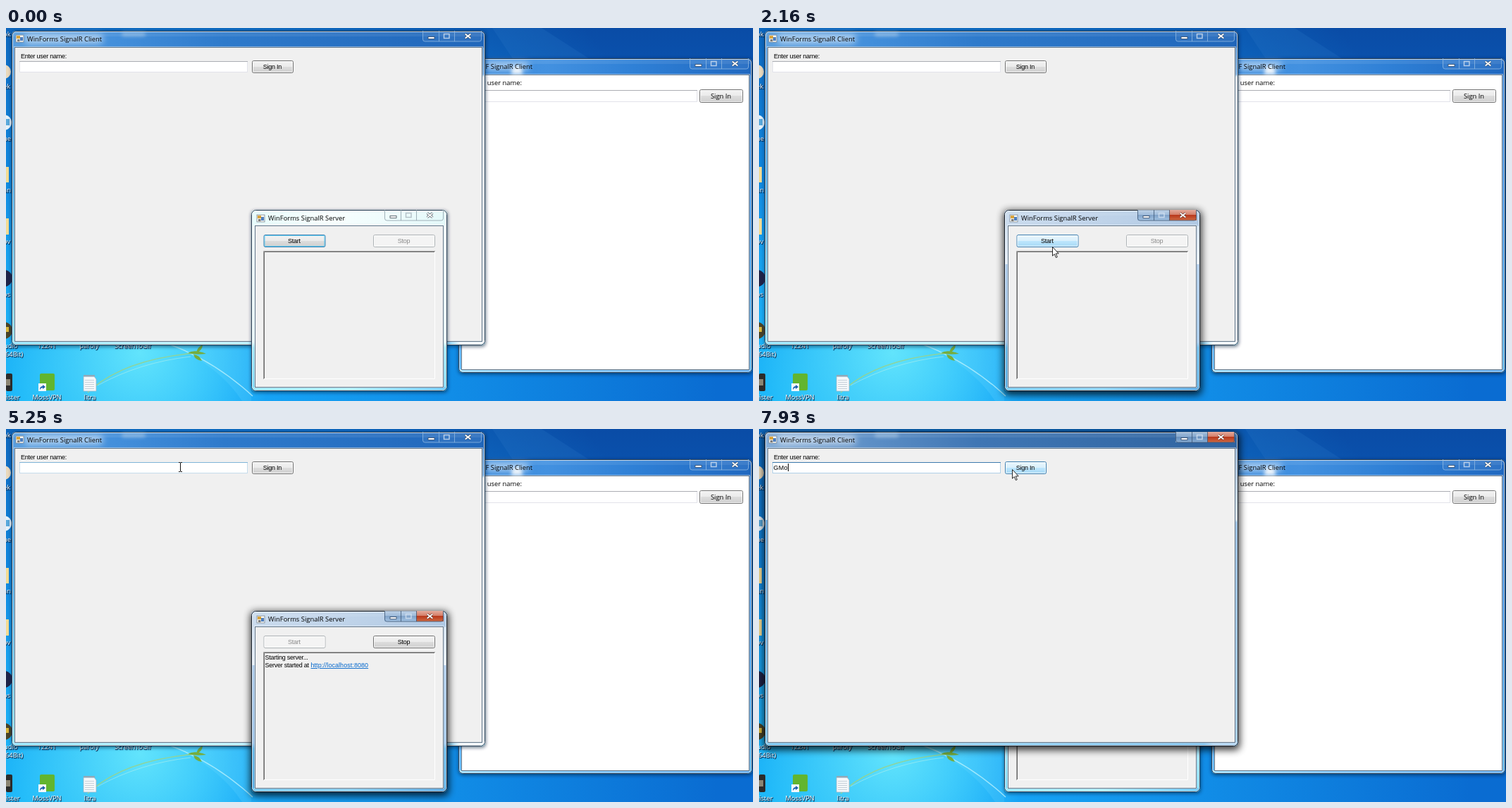
Animation of 1060x529 px, one loop 8000 ms. Source, as an HTML page:

```html
<!DOCTYPE html>
<html lang="en">
<head>
<meta charset="utf-8">
<title>SignalR chat demo</title>
<style>
html, body { margin: 0; width: 100%; height: 100%; overflow: hidden; background: #0b5cb4; }
svg { display: block; width: 100vw; height: 100vh; }
text { white-space: pre; }
.ui { font: 9.4px "Open Sans", "Noto Sans", sans-serif; }
.form { font: 9px "Liberation Sans", Arial, sans-serif; letter-spacing: -.25px; }
.link { letter-spacing: .05px; fill: #0066cc; text-decoration: underline; }
.typed { letter-spacing: .2px; }
.mid { text-anchor: middle; }
.end { text-anchor: end; }
</style>
</head>
<body>
<svg id="stage" viewBox="0 0 1060 529" preserveAspectRatio="none"></svg>
<script>
const LOOP = 8000;
const stage = document.getElementById('stage');
const $ = id => document.getElementById(id);

// Markup helpers
let defs = '', gradCount = 0;
const rect = (x, y, w, h, fill, more = '') =>
  `<rect x="${x}" y="${y}" width="${w}" height="${h}" fill="${fill}" ${more}/>`;
const path = (d, more) => `<path d="${d}" ${more}/>`;
const text = (x, y, s, cls, fill = '#000', more = '') =>
  `<text x="${x}" y="${y}" class="${cls}" fill="${fill}" ${more}>${s}</text>`;
const group = (id, body, hidden) =>
  `<g id="${id}"${hidden ? ' display="none"' : ''}>${body}</g>`;
const outline = (x, y, w, h, color, r = 0) =>
  rect(x + .5, y + .5, w - 1, h - 1, 'none', `stroke="${color}" rx="${r}"`);

// Stops are "color" or "color offset"; plain colors are spread evenly.
function grad(dir, ...stops) {
  const id = 'g' + gradCount++;
  const end = dir === 'v' ? 'x2="0" y2="1"' : 'x2="1" y2="0"';
  defs += `<linearGradient id="${id}" ${end}>` + stops.map((s, i) => {
    const [c, at = i / (stops.length - 1)] = s.split(' ');
    return `<stop offset="${at}" stop-color="${c}"/>`;
  }).join('') + '</linearGradient>';
  return `url(#${id})`;
}

function glow(id, cx, cy, r, color) {
  defs += `<radialGradient id="${id}" gradientUnits="userSpaceOnUse" cx="${cx}" cy="${cy}" r="${r}">
    <stop stop-color="${color}"/><stop offset="1" stop-color="${color}" stop-opacity="0"/></radialGradient>`;
  return rect(0, 0, 1060, 529, `url(#${id})`);
}

const blur = (id, size) =>
  `<filter id="${id}" x="-30%" y="-100%" width="160%" height="300%"><feGaussianBlur stdDeviation="${size}"/></filter>`;
defs += blur('soft', 2.5) + blur('wide', 5.5) + blur('halo', 5);

// Desktop
function label(x, y, s, cls = 'ui mid') {
  return text(x + .7, y + 1, s, cls, '#02294f', 'stroke="#02294f" stroke-width="1" stroke-opacity=".45"') +
    text(x, y, s, cls, '#fff');
}

function desktop() {
  const circle = (y, r, c) => `<circle cx="-3" cy="${y}" r="${r}" fill="${c}"/>`;
  let s = rect(0, 0, 1060, 529, grad('v', '#0a4ca6', '#0a62c2 .4', '#0a6cd0 .8', '#0a6cd2'));
  s += glow('sky', 250, 500, 760, '#18aefc') + glow('left', 40, 540, 330, '#20bcfa') + glow('core', 190, 460, 190, '#62e4fc');
  s += path('M690 0L760 0L830 45H720Z', 'fill="#2b74c2" opacity=".25"');
  s += path('M205 440Q285 462 350 522', 'fill="none" stroke="#c4f5fd" stroke-width="1.4" opacity=".75"');
  s += path('M215 440Q300 475 335 529H348V440Z', 'fill="#9be8fb" opacity=".12"');
  s += path('M116 517Q165 470 268 461', 'fill="none" stroke="#8fd49a" stroke-width="1.6"');
  s += path('M130 507Q190 474 262 466', 'fill="none" stroke="#c9f3e6" stroke-width=".7" opacity=".7"');
  s += path('M258 461Q267 455 284 462Q270 464 258 461M270 461Q271 453 279 449Q279 457 270 461M266 463Q268 471 278 472Q275 464 266 463',
    'fill="#76ad3d"');
  // Icons cut by the left edge
  s += circle(62, 10, '#e9d9bd') + circle(134, 11, '#e4f2fb') + rect(0, 129, 5, 9, '#5aa9dc');
  s += rect(0, 197, 4, 22, '#f3dc95') + rect(0, 270, 4, 23, '#f3dc95');
  s += circle(355, 12, '#1f2449') + circle(429, 12, '#4a4429') + rect(0, 424, 4, 7, '#d9b63a');
  s += rect(0, 490, 9, 25, '#2b2b2b', 'rx="2"') + rect(0, 498, 6, 9, '#8b8573');
  [['ok', 12], ['ek', 86], ['ne', 160], ['an', 233], ['ov', 306], ['os', 381]]
    .forEach(([t, y]) => s += label(-4, y, t, 'ui'));
  s += label(-3, 454, 'udio', 'ui') + label(-1, 466, '64Bit)', 'ui') + label(-5, 527, 'eister', 'ui');
  s += label(58, 454, '12241') + label(118, 454, 'paroly') + label(180, 454, 'ScreenToGif');
  // Whole icons
  s += rect(48, 490, 21, 24, '#62b52f', 'rx="2"');
  s += rect(46, 504, 11, 11, '#f4f8fc') + path('M48 513Q48 508 52 508V506L56 509L52 512V510Q50 510 48 513', 'fill="#1b5fae"');
  s += path('M110 494H125L128 498V515H110Z', 'fill="#f5f8fa" stroke="#9fb4c4" stroke-width=".8"');
  for (let y = 499; y < 513; y += 3) s += rect(112, y, 13, .8, '#b9c6d0');
  s += rect(110, 492, 16, 2.4, '#8fa9b9');
  return s + label(58, 527, 'MossVPN') + label(119, 527, 'litra');
}

// Windows
const RED = grad('v', '#e5ab9c', '#d47f6a .45', '#b9391d .5', '#cf6a42');
const CAP_BLUE = grad('v', '#b9cfe6', '#9ab8d8 .45', '#7398c2 .5', '#9dc0e2');

function captions(right, y, look) {
  const xs = [right - 84, right - 61, right - 39, right], h = 15;
  const dark = look === 'pale' ? '#3f4a54' : '#2e4664';
  const line = look === 'pale' ? '#8c9ea8' : look === 'active' ? '#3c5674' : '#8fb8e2';
  let s = '';
  if (look === 'active')
    s += rect(xs[0], y, 45, h, CAP_BLUE, 'opacity=".8"') + rect(xs[2], y, 39, h, RED);
  s += path(`M${xs[0] + .5} ${y}v${h - 3}q0 3 3 3H${right - 3.5}q3 0 3-3V${y}M${xs[1] + .5} ${y}v${h}M${xs[2] + .5} ${y}v${h}`,
    `fill="${look === 'blue' ? '#fff' : 'none'}" fill-opacity=".06" stroke="${line}" stroke-width="1" stroke-opacity=".8"`);
  const mx = xs[0] + 8, qx = xs[1] + 7, cx = xs[2] + 19.5, cy = y + 7.5;
  const cross = `M${cx - 3.8} ${cy - 3}l7.6 6m0 -6l-7.6 6`;
  s += rect(mx, y + 8.5, 9, 3, '#fff', `stroke="${dark}" stroke-width=".8"`);
  s += rect(qx + .5, y + 4.5, 7.5, 6, 'none', `stroke="${look === 'pale' ? '#a9b5bd' : '#d5e3f2'}" stroke-width="1.5" opacity=".8"`);
  s += path(cross, `stroke="${look === 'active' ? '#5c2a22' : dark}" stroke-width="3.4"`);
  return s + path(cross, 'stroke="#fff" stroke-width="1.9"');
}

function frame(o) {
  const { x, y, w, h, look, pad, top, foot } = o, active = look === 'active';
  const r = 'rx="6"';
  let s = active
    ? rect(x - 1, y + 1, w + 3, h + 4, '#000', `${r} filter="url(#wide)" opacity=".8"`)
    : rect(x, y + 1, w + 1, h + 1, '#001a38', `${r} filter="url(#soft)" opacity=".6"`);
  s += rect(x, y, w, h, o.side, r);
  if (o.right) s += rect(x + w - pad - 2, y + top, pad + 2, h - top - 4, o.right);
  s += rect(x + 2, y + h - foot, w - 4, foot - 1, o.base);
  s += path(`M${x} ${y + top}V${y + 6}q0 -6 6 -6H${x + w - 6}q6 0 6 6V${y + top}Z`, `fill="${o.title}"`);
  s += rect(x + 2, y + 1, w - 4, 7, '#fff', 'opacity=".08"');
  if (o.halo) s += rect(...o.halo, '#fff', 'rx="6" filter="url(#halo)" opacity=".55"');
  s += outline(x, y, w, h, active ? '#16212e' : '#2c4258', 6);
  s += rect(x + 1.5, y + 1.5, w - 3, h - 3, 'none', 'rx="5" stroke="#fff" stroke-opacity=".65"');
  s += rect(x + pad - 1.5, y + top - 1.5, w - 2 * pad + 3, h - top - foot + 3, 'none', 'stroke="#fff" stroke-opacity=".45"');
  s += rect(x + pad - .5, y + top - .5, w - 2 * pad + 1, h - top - foot + 1, o.body, 'stroke="#5f7488"');
  return s + captions(x + w - 5, y, look);
}

const formIcon = (x, y) =>
  rect(x, y, 11, 10, '#f7f7f2', 'stroke="#7b8794" stroke-width=".8"') + rect(x + 1, y + 1, 5, 4, '#d9a43c') +
  rect(x + 6, y + 3, 4, 5, '#4d7fc0') + rect(x + 2, y + 6, 3.5, 3, '#7d7d7d');

// Buttons
const FACES = {
  normal: [grad('v', '#f2f2f2', '#ebebeb .5', '#dddddd .5', '#cfcfcf'), '#707070'],
  focus: [grad('v', '#f2f2f2', '#ebebeb .5', '#dddddd .5', '#cfcfcf'), '#3c7fb1', '#42c6f2'],
  hover: [grad('v', '#eaf6fd', '#d9f0fc .5', '#bee6fd .5', '#a7d9f5'), '#3c7fb1'],
  press: [grad('v', '#e5f4fc', '#c4e5f6 .5', '#98d1ef .5', '#68b3db'), '#2c628b'],
  off: ['#f4f4f4', '#adb2b5']
};

function button(id, x, y, w, h, caption, cls, states) {
  return states.map((st, i) => {
    const [fill, edge, ring = '#fff'] = FACES[st];
    return group(`${id}-${st}`,
      rect(x + .5, y + .5, w - 1, h - 1, fill, `rx="2" stroke="${edge}"`) +
      rect(x + 1.5, y + 1.5, w - 3, h - 3, 'none', `rx="1" stroke="${ring}" stroke-opacity=".8"`) +
      text(x + w / 2 - .5, y + h / 2 + 3.3, caption, cls + ' mid', st === 'off' ? '#8b8b8b' : '#000'), i);
  }).join('');
}

function field(x, y, w, h, topLine, rest) {
  return rect(x, y, w, h, '#fff') + outline(x, y, w, h, rest) + rect(x, y, w, 1, topLine);
}

const caret = id => group(id, rect(0, 0, 1, 11, '#000'), true);

function wpfClient() {
  return frame({
    x: 642, y: 43, w: 417, h: 446, pad: 5, top: 24, foot: 5, look: 'blue', body: '#fff',
    title: grad('h', '#3a8ada', '#4391e0 .3', '#2f80d6 .6', '#2068c0'),
    side: grad('v', '#2a78d0', '#2b8ce6 .6', '#3fa8f6'),
    base: grad('h', '#86d8fc', '#5cb8f8 .4', '#3f9cf0'), halo: [680, 48, 62, 12]
  }) + path('M717 66Q717 54 725 54T733 66Z', 'fill="#fff" opacity=".85" filter="url(#soft)"') +
    text(747, 57.5, 'WPF SignalR Client', 'ui end') +
    text(732, 81, 'Enter user name:', 'ui end') +
    field(653, 88, 328, 17, '#abadb3', '#e2e3ea') +
    button('wpfSign', 984, 87, 62, 19, 'Sign In', 'ui', ['normal']);
}

function formClient() {
  const box = { x: 8, y: 4, w: 672, h: 446, pad: 5, top: 24, foot: 6, body: '#f0f0f0', halo: [26, 9, 112, 13] };
  const idle = frame({
    ...box, look: 'blue',
    title: grad('h', '#5b9fde', '#438fdb .22', '#2e7acb .45', '#2066ba'),
    side: grad('v', '#3f8edb', '#32a0ee .5', '#86defb'),
    right: grad('v', '#3f84cb', '#5c9ad6 .09', '#eaf1f7 .1', '#f2f5f7'),
    base: grad('h', '#8adefb', '#b8effc .4', '#8fd6f9 .93', '#eef5fa .95', '#eef5fa')
  });
  const active = frame({
    ...box, look: 'active',
    title: grad('h', '#86aed8', '#5d8fc6 .22', '#3f76b4 .45', '#2f639f'),
    side: grad('v', '#8db5df', '#b9d4ee .28', '#3f8fd2 .28', '#66b8e8'),
    right: grad('v', '#86abd2', '#d3e2f1 .24', '#7fb0e0 .25', '#8fc2ec'),
    base: grad('h', '#6cbdea', '#8bcdf0 .4', '#76bbe8 .93', '#a9cfee .95', '#a9cfee')
  });
  const boxes = { plain: ['#abadb3', '#e2e3ea'], over: ['#7fb4d8', '#c5dcec'], focus: ['#3d7bad', '#b0d0e8'] };
  return group('clientIdle', idle) + group('clientActive', active, true) +
    rect(164, 6, 34, 6, '#b7d3ea', 'rx="3" filter="url(#soft)" opacity=".55"') +
    formIcon(14, 10) + text(30, 18.5, 'WinForms SignalR Client', 'ui') +
    text(21, 43, 'Enter user name:', 'form') +
    Object.entries(boxes).map(([k, c]) => group('name-' + k, field(19, 47, 324, 16, ...c))).join('') +
    '<text id="typed" x="20.5" y="58.3" class="form typed"></text>' + caret('nameCaret') +
    button('sign', 349, 46, 59, 18, 'Sign In', 'form', ['normal', 'hover']);
}

function formServer() {
  const box = { x: 348, y: 258, w: 278, h: 257, pad: 6, top: 23, foot: 6, body: '#f0f0f0' };
  const idle = frame({
    ...box, look: 'pale', title: grad('h', '#e6fbfb', '#f8fefe .4', '#e4f9fa'),
    side: grad('v', '#eefafa', '#e6f8fa .73', '#9fe6fb .76', '#7ad8fa'),
    base: grad('h', '#93e6fb', '#a8ecfc .5', '#62c4f8')
  });
  const active = frame({
    ...box, look: 'active', title: grad('h', '#cbdcee', '#bfd3e9 .5', '#b0c9e4'),
    side: grad('v', '#c3d7ec', '#e6eef7 .3', '#a9c8e8 .3', '#9cc3e8 .73', '#5fb4e6 .76', '#55abe2'),
    base: grad('h', '#6cc5ee', '#7fcbef .5', '#4ca0de')
  });
  return group('serverIdle', idle) + group('serverActive', active, true) +
    formIcon(356, 265) + text(372, 272.7, 'WinForms SignalR Server', 'ui') +
    button('start', 365.5, 293, 88, 18, 'Start', 'form', ['focus', 'hover', 'press', 'off']) +
    button('stop', 521, 293, 88, 18, 'Stop', 'form', ['off', 'normal']) +
    rect(365, 316, 244, 182, '#f0f0f0') + path('M608.5 317V497.5H366', 'fill="none" stroke="#fff"') +
    path('M365.5 498V316.5H609', 'fill="none" stroke="#a0a0a0"') +
    path('M366.5 497V317.5H608', 'fill="none" stroke="#696969"') +
    group('log1', text(367.5, 327.3, 'Starting server...', 'form'), true) +
    group('log2', text(367.5, 338, 'Server started at ', 'form') +
      text(432.5, 338, 'http://localhost:8080', 'form link', '#0066cc'), true) + caret('logCaret');
}

const pointers =
  group('arrow', path('M.5 .5V13.2L3.3 10.6L5.4 15.6L7.3 14.8L5.2 9.9H9.2Z', 'fill="#fff" stroke="#111" stroke-width=".9"'), true) +
  group('beam', path('M-2.5 -6.5H-.7L0 -6L.7 -6.5H2.5M0 -6V6M-2.5 6.5H-.7L0 6L.7 6.5H2.5', 'fill="none" stroke="#111" stroke-width="1"'), true);

const scene = group('desk', desktop()) + group('wpf', wpfClient()) + group('client', formClient()) +
  group('server', formServer()) + group('pointer', pointers);
stage.innerHTML = `<defs>${defs}</defs>${scene}`;

// Pointer: each path is [start, end, points], moving in equal time steps
const sweep = Array.from({ length: 11 }, (_, i) => {
  const p = i / 10, e = p * p * (3 - 2 * p);
  return [938 - 466 * e, 475 - 196 * Math.pow(e, 1.1)];
});
const PATHS = [
  [510, 1300, sweep],
  [1380, 1380, [[471, 269]]],
  [1690, 2310, [[466, 275], [455, 284], [442, 294], [430, 301], [421, 307], [417, 309], [416, 310], [415, 306], [415, 300]]],
  [4630, 5350, [[398, 268], [340, 176], [259, 59], [249, 46], [248, 49], [248, 52], [247, 53], [247, 54], [246, 53], [246, 54]]],
  [7770, 7930, [[285, 54], [337, 56], [359, 57]]]
];

function pointerAt(t) {
  const leg = PATHS.filter(p => t >= p[0]).pop();
  if (!leg) return null;
  const [from, to, pts] = leg, last = pts.length - 1;
  const i = last ? Math.floor((t - from) / (to - from) * last + 1e-6) : 0;
  return pts[Math.min(last, i)];
}

// Display rules
const show = (id, on) => $(id).setAttribute('display', on ? 'inline' : 'none');
const pick = (id, states, current) => states.forEach(s => show(`${id}-${s}`, s === current));
const within = (t, ...spans) => spans.some(([a, b]) => t >= a && t < b);
const place = (id, x, y) => $(id).setAttribute('transform', `translate(${x} ${y})`);

function draw(t) {
  const clientOn = t >= 5270, serverOn = t >= 1470 && !clientOn;
  const above = clientOn ? $('client') : $('server');
  if ($('pointer').previousSibling !== above) stage.insertBefore(above, $('pointer'));
  show('clientIdle', !clientOn);
  show('clientActive', clientOn);
  show('serverIdle', !serverOn);
  show('serverActive', serverOn);

  pick('start', ['focus', 'hover', 'press', 'off'],
    t < 1840 ? 'focus' : t < 2620 ? 'hover' : t < 2770 ? 'press' : 'off');
  pick('stop', ['off', 'normal'], t < 3400 ? 'off' : 'normal');
  show('log1', t >= 2770);
  show('log2', t >= 3400);
  show('logCaret', within(t, [2770, 3320], [3400, 3930], [4400, 4950]));
  place('logCaret', 368, t < 3400 ? 329 : 339);

  pick('name', ['plain', 'over', 'focus'], t < 4790 ? 'plain' : t < 5530 ? 'over' : 'focus');
  pick('sign', ['normal', 'hover'], t < 7930 ? 'normal' : 'hover');
  const count = [6600, 6680, 7700].filter(k => t >= k).length;
  $('typed').textContent = 'GMo'.slice(0, count);
  show('nameCaret', within(t, [5350, 5900], [6370, 7150], [7620, LOOP]));
  place('nameCaret', [21, 28, 36, 41][count], 49);

  const at = pointerAt(t), hidden = !at || within(t, [6600, 7770]);
  const beam = at && at[0] > 19 && at[0] < 343 && at[1] > 47 && at[1] < 63;
  show('arrow', !hidden && !beam);
  show('beam', !hidden && beam);
  if (at) place('pointer', Math.round(at[0]) + (beam ? .5 : 0), Math.round(at[1]));
}

const began = performance.now();
function tick() {
  draw((performance.now() - began) % LOOP);
  requestAnimationFrame(tick);
}
tick();
</script>
</body>
</html>
```
